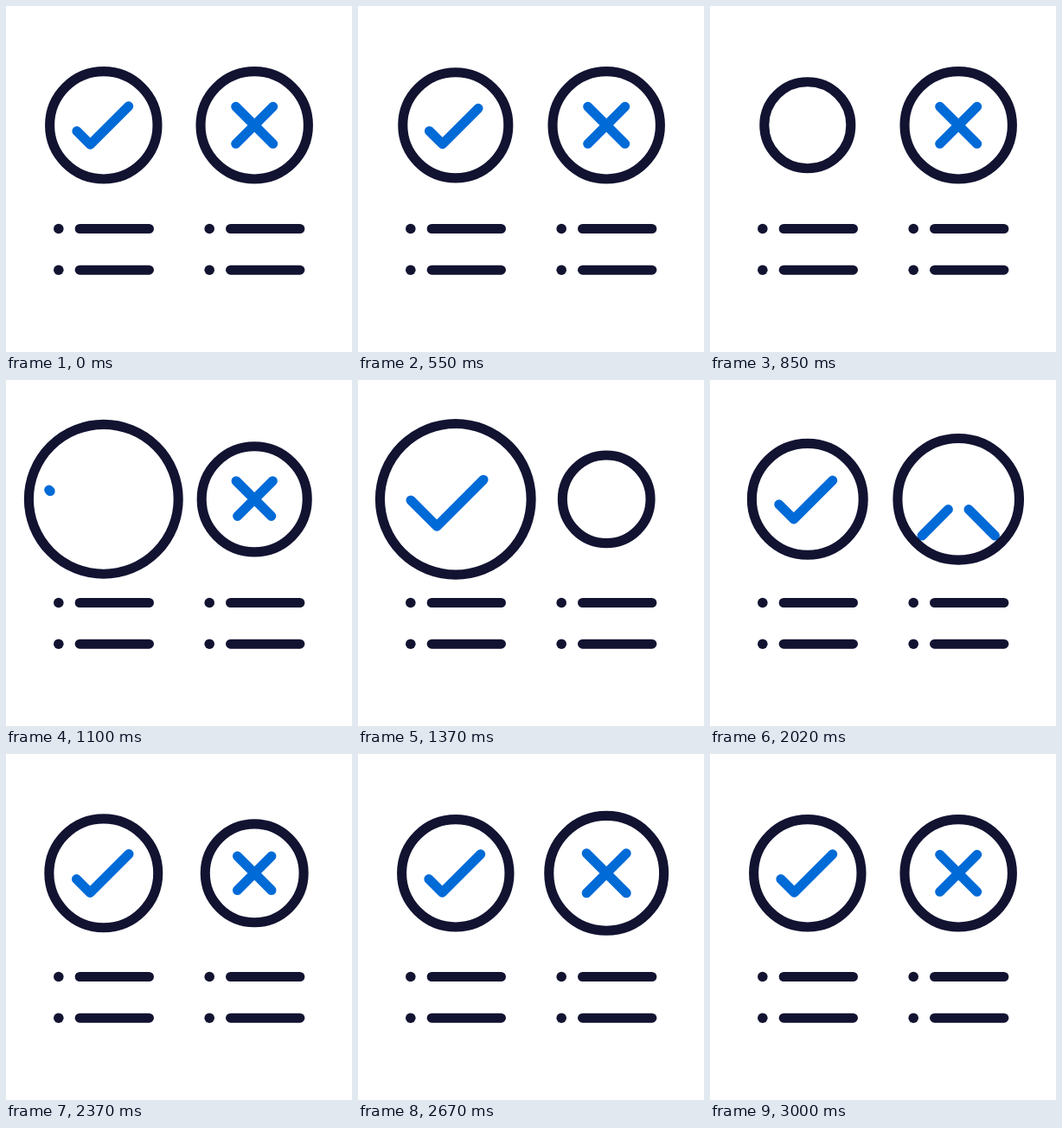
Write an HTML page that moves like this. It is 400x400 px and loops after 3020 ms.

```html
<!DOCTYPE html>
<html lang="en">
<head>
<meta charset="utf-8">
<title>Check and cross</title>
<style>
  html, body { margin: 0; width: 100%; height: 100%; overflow: hidden; background: #fff; }
  svg { display: block; width: 100vw; height: 100vh; }
  svg * { fill: none; stroke-width: 11.1; stroke-linecap: round; stroke-linejoin: round; }
  .ink { stroke: #121331; }
  .mark { stroke: #006ad7; }
  .dot { fill: #121331; }
</style>
</head>
<body>
<svg viewBox="0 0 400 400">
  <defs>
    <g id="row">
      <circle class="dot" cx="60.8" cy="257.5" r="5.8"/>
      <path class="ink" d="M85.2 257.5H165.4"/>
    </g>
    <g id="list">
      <use href="#row"/>
      <use href="#row" y="47.7"/>
    </g>
  </defs>
  <use href="#list"/>
  <use href="#list" x="174.4"/>
  <g id="yes" transform="translate(112.8 137.8)"><path class="mark"/><circle class="ink"/></g>
  <g id="no" transform="translate(287.2 137.8)"><path class="mark"/><circle class="ink"/></g>
</svg>
<script>
const LOOP = 3020, START = 520, LAG = 550, RADIUS = 62.2;

const clamp = (v, lo, hi) => Math.min(hi, Math.max(lo, v));
const linear = p => p;
const smooth = p => p * p * (3 - 2 * p);
const cubicOut = p => 1 - (1 - p) ** 3;

// Eased progress from 0 to 1 between two times
const ramp = (t, from, to, ease = smooth) => ease(clamp((t - from) / (to - from), 0, 1));

// The ring shrinks, bursts open and settles in ever smaller swings
const ringScale = (t, peak) => 1
  - 0.2 * ramp(t, START, 850, linear)
  + (peak - 0.8) * ramp(t, 850, 1315, cubicOut)
  - (peak - 0.85) * ramp(t, 1315, 1635)
  + 0.22 * ramp(t, 1635, 2150)
  - 0.07 * ramp(t, 2150, 2450);

// Distance of a mark from its resting place along its own path
const checkSlide = t => -74 + 79 * ramp(t, 1080, 1460) - 6 * ramp(t, 1460, 2020) + ramp(t, 2020, 2400);
const crossSlide = t => -59 + 91 * ramp(t, 1080, 1470) - 32 * ramp(t, 1470, 1820);

// Positions along the check count from its corner
function checkPath([tail, head], s) {
  const at = d => `${(-15.4 + d) * s} ${(22.3 - Math.abs(d)) * s}`;
  const corner = tail < 0 && head > 0 ? `L${at(0)}` : "";
  return `M${at(tail)}${corner}L${at(head)}`;
}

// Positions along both diagonals count from the centre
function crossPath([tail, head], s) {
  const a = tail * s, b = head * s;
  return `M${a} ${a}L${b} ${b}M${-a} ${a}L${-b} ${b}`;
}

const icons = [
  { id: "yes", lag: 0, peak: 1.453, rest: [-15.5, 44.3], track: [-30, 60], slide: checkSlide, path: checkPath },
  { id: "no", lag: LAG, peak: 1.39, rest: [-21.5, 21.5], track: [-37.3, 37.3], slide: crossSlide, path: crossPath }
];

// The mark is wiped back to its tail, then slides in along its track
function visiblePart({ rest: [tail, head], track, slide }, t) {
  if (t < 900) return [tail, head - (head - tail) * ramp(t, START, 790)];
  return [tail, head].map(d => clamp(d + slide(t), ...track));
}

function draw(icon, time) {
  const t = time - icon.lag;
  const s = ringScale(t, icon.peak);
  const part = visiblePart(icon, t);
  const [mark, ring] = document.getElementById(icon.id).children;
  ring.setAttribute("r", RADIUS * s);
  mark.setAttribute("d", part[1] - part[0] > 0.5 ? icon.path(part, s) : "");
}

function frame() {
  const time = performance.now() % LOOP;
  icons.forEach(icon => draw(icon, time));
  requestAnimationFrame(frame);
}
frame();
</script>
</body>
</html>
```
